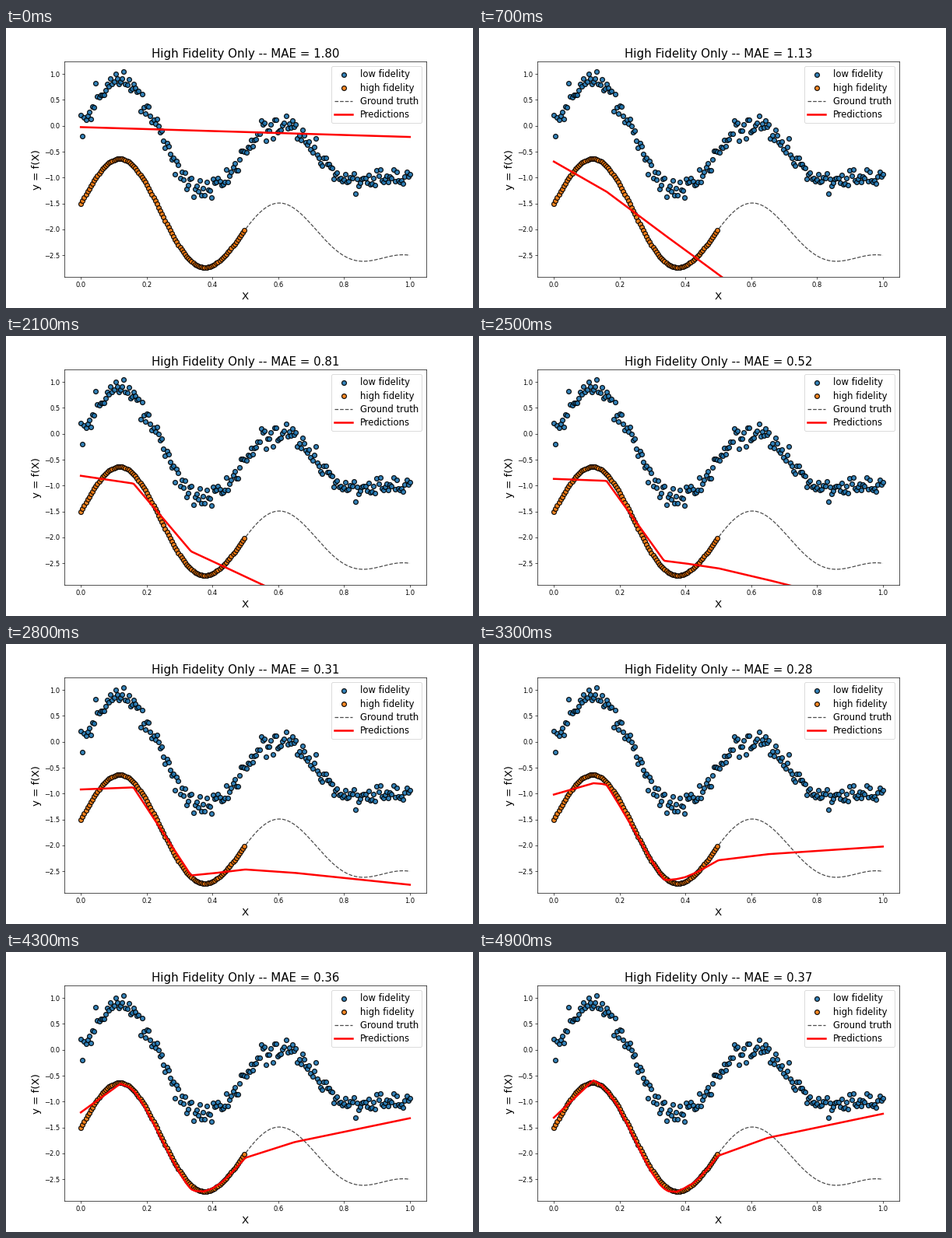
Recreate the animation shown at these times as a matplotlib script. Size 600 by 360 pixels, loop 5000 ms.

```python
import numpy as np
import matplotlib.pyplot as plt
from matplotlib.animation import FuncAnimation

FRAMES, INTERVAL = 50, 100
plt.rcParams["font.family"] = "DejaVu Sans"

x = np.linspace(0, 1, 200)


def ground_truth(x):
    return (1 - x**2) * np.sin(4 * np.pi * x) - x - 1.5


truth = ground_truth(x)
noise = np.random.default_rng(3).normal(0, 0.1, x.size)
low = np.minimum(truth + 1.5 + noise, 1.05)

# Heights of the learned curve's bends at a few training stages
bends = np.array([0, .16, .335, .4, .5, .65, 1])
stages = {
    0: -.025 - .19 * bends,
    7: [-.69, -1.27, -2.10, -2.40, -2.87, -3.57, -5.20],
    14: [-.72, -1.14, -2.14, -2.43, -2.88, -3.57, -5.30],
    21: [-.81, -.96, -2.27, -2.46, -2.76, -3.20, -4.24],
    28: [-.92, -.88, -2.58, -2.54, -2.465, -2.53, -2.76],
    38: [-1.12, -.79, -2.69, -2.67, -2.15, -1.91, -1.53],
    49: [-1.31, -.78, -2.69, -2.66, -2.045, -1.70, -1.235],
}
times = np.array(list(stages))
heights = np.array(list(stages.values()))
speeds = np.gradient(heights, times, axis=0)

# Finer curvature that the model picks up late, only where it has data
fine = np.append(0, np.linspace(0.12, 0.5, 16))
detail = np.where(x < 0.5,
                  np.interp(x, fine, ground_truth(fine))
                  - np.interp(x, bends, ground_truth(bends)), 0)


def prediction(frame):
    """Cubic Hermite blend between training stages, plus the late detail."""
    i = min(np.searchsorted(times, frame, side="right") - 1, len(times) - 2)
    span = times[i + 1] - times[i]
    s = (frame - times[i]) / span
    y = ((1 + 2 * s) * (1 - s)**2 * heights[i]
         + s * (1 - s)**2 * span * speeds[i]
         + s**2 * (3 - 2 * s) * heights[i + 1]
         + s**2 * (s - 1) * span * speeds[i + 1])
    refined = np.clip((frame - 28) / 21, 0, 1)
    return np.interp(x, bends, y) + refined * detail


fig, ax = plt.subplots(figsize=(10, 6), dpi=60)
dots = dict(s=50, edgecolors="black", linewidths=1.5, alpha=0.9)
ax.scatter(x, low, color="tab:blue", label="low fidelity", **dots)
ax.scatter(x[:100], truth[:100], color="tab:orange", label="high fidelity", **dots)
ax.plot(x, truth, "k--", lw=1.5, alpha=0.7, zorder=0.9, label="Ground truth")
line, = ax.plot(x, prediction(0), color="red", lw=3, label="Predictions")
ax.set_xlim(-0.05, 1.05)
ax.set_ylim(-2.923, 1.24)
ax.set_xlabel("X", fontsize=16)
ax.set_ylabel("y = f(X)", fontsize=16)
title = ax.set_title("", fontsize=18)
ax.legend(loc="upper right", fontsize=14, labelspacing=0.38, borderpad=0.35)


def update(frame):
    y = prediction(frame)
    line.set_ydata(y)
    title.set_text(f"High Fidelity Only -- MAE = {np.abs(y - truth).mean():.2f}")
    return line, title


anim = FuncAnimation(fig, update, frames=FRAMES, interval=INTERVAL,
                     repeat=True, repeat_delay=0)
plt.show()
```
